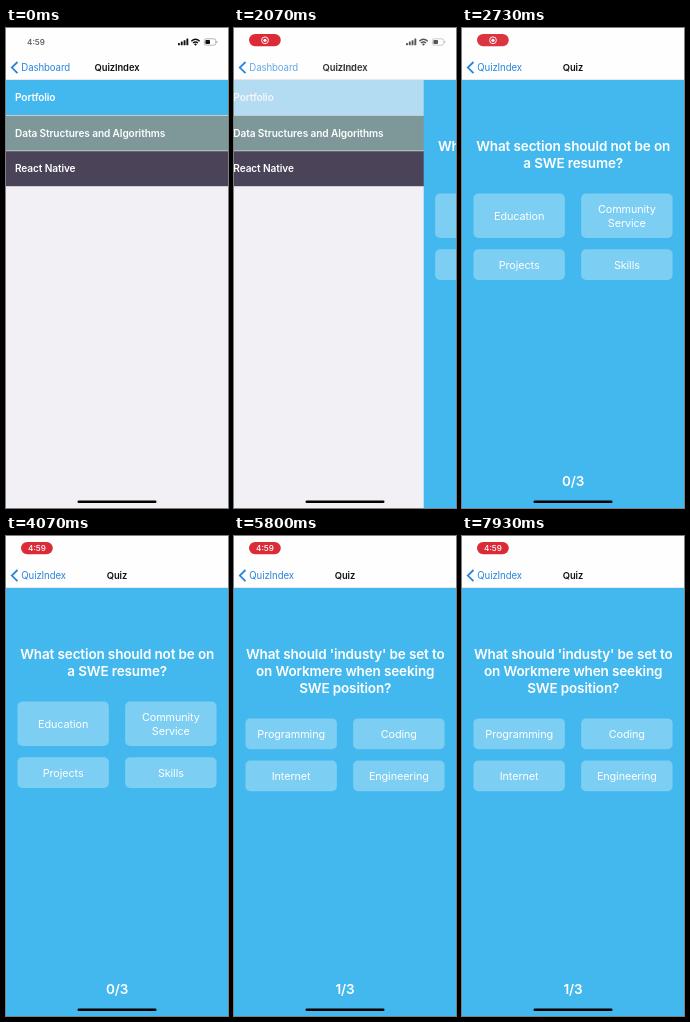
Write an HTML page that moves like this. It is 222 px wide and 480 px high and loops after 8 s.

```html
<!DOCTYPE html>
<html lang="en">
<head>
<meta charset="utf-8">
<title>Quiz app</title>
<style>
html, body { margin: 0; width: 100%; height: 100%; overflow: hidden; background: #f2f0f4; }
svg { display: block; width: 222px; height: 480px; }
text { font-family: Inter, "Liberation Sans", sans-serif; letter-spacing: -.01em; white-space: pre; }
.mid { text-anchor: middle; }
.row { font-size: 10.1px; font-weight: 600; fill: #fff; }
.title { font-size: 9.4px; font-weight: 600; fill: #111; }
.back { font-size: 9.65px; fill: #2685dc; }
.ask { font-size: 13.5px; font-weight: 600; fill: #fff; }
.answer { font-size: 10.85px; fill: #fff; }
.clock { font-size: 8.2px; font-weight: 500; letter-spacing: 0; }
</style>
</head>
<body>
<svg id="stage" viewBox="0 0 222 480"></svg>
<script>
const LOOP = 8000;
const BLUE = '#43b8ee';

const rect = (x, y, w, h, fill, rx = 0) =>
  `<rect x="${x}" y="${y}" width="${w}" height="${h}" rx="${rx}" fill="${fill}"/>`;
const text = (cls, x, y, s, extra = '') =>
  `<text class="${cls}" x="${x}" y="${y}" ${extra}>${s}</text>`;
const group = (id, body) => `<g id="${id}">${body}</g>`;

const row = (i, fill, label) => group('row' + i,
  rect(0, 52 + i * 35.6, 222, 35, fill) + text('row', 9, 73.2 + i * 35.6, label));

function button(id, x, y, h, lines) {
  const first = y + h / 2 + 4.1 - (lines.length - 1) * 6.8;
  return group(id, rect(x, y, 91.5, h, 'rgba(255,255,255,.3)', 5) +
    lines.map((s, i) => text('answer mid', x + 45.75, first + i * 13.6, s)).join(''));
}

function question(id, lines, tops, heights, answers, score) {
  const ask = lines.map((s, i) => text('ask mid', 111.2, 122.6 + i * 17, s)).join('');
  const buttons = answers.map((a, i) =>
    button(id + 'b' + i, i % 2 ? 119.1 : 11.4, tops[i >> 1], heights[i >> 1], a)).join('');
  return group(id, ask + buttons + text('ask mid', 111, 457.6, score));
}

const list = rect(0, 52, 222, 428, '#f2f0f4') +
  row(0, BLUE, 'Portfolio') +
  row(1, '#7e9798', 'Data Structures and Algorithms') +
  row(2, '#4b4459', 'React Native');

const quiz = rect(0, 52, 222, 428, BLUE) +
  question('q1', ['What section should not be on', 'a SWE resume?'], [165.5, 221.2], [44.4, 30.8],
    [['Education'], ['Community', 'Service'], ['Projects'], ['Skills']], '0/3') +
  question('q2', ["What should 'industy' be set to", 'on Workmere when seeking', 'SWE position?'],
    [182.4, 224.5], [30.8, 30.8],
    [['Programming'], ['Coding'], ['Internet'], ['Engineering']], '1/3');

const bars = [2.2, 3.6, 5, 6.6].map((h, i) => rect(172 + i * 2.8, 17.2 - h, 1.9, h, '#111', .5)).join('');
const wifi = `<g fill="none" stroke="#111" stroke-width="1.4">
  <path d="M185.3 13.2q4.2-3.8 8.4 0M187 15q2.5-2.2 5 0"/></g>
  <path d="M188 16.2q1.5-1.2 3 0l-1.5 1.5z" fill="#111"/>`;
const battery = `<rect x="198.3" y="10.8" width="11.4" height="6.4" rx="1.8" fill="none"
  stroke="#999" stroke-width=".7"/>` + rect(199.4, 11.9, 4.6, 4.2, '#111', .8) +
  rect(210.4, 13, .9, 2.2, '#999', .4);

const header = rect(0, 0, 222, 52, '#fefefe') + rect(0, 51.6, 222, .4, '#c8c8cc') +
  '<path d="M11.5 34L5.8 39.6L11.5 45.2" fill="none" stroke="#2685dc" stroke-width="1.8"/>' +
  text('back', 15.3, 43.2, 'Dashboard', 'id="oldBack"') +
  text('back', 15.3, 43.2, 'QuizIndex', 'id="newBack"') +
  text('title mid', 111, 43, 'QuizIndex', 'id="oldTitle"') +
  text('title mid', 111, 43, 'Quiz', 'id="newTitle"') +
  text('clock mid', 30, 17, '4:59', 'id="clock" fill="#555"') +
  group('pill', rect(15, 6, 31.8, 12.2, '#db2b37', 6.1) +
    group('dot', `<circle cx="31" cy="12.3" r="3.4" fill="none" stroke="#fff" stroke-width=".9"/>
      <circle cx="31" cy="12.3" r="1.6" fill="#fff"/>`) +
    text('clock mid', 31, 15.3, '4:59', 'id="pillClock" fill="#fff"')) +
  group('status', bars + wifi + battery);

const stage = document.getElementById('stage');
stage.innerHTML = group('list', list) + group('quiz', quiz) + header +
  rect(71.5, 472.4, 79, 2.6, '#000', 1.3);

const el = id => document.getElementById(id);
const fade = (id, v) => el(id).setAttribute('opacity', v);
const slide = (id, x) => el(id).setAttribute('transform', `translate(${x} 0)`);
const clamp = v => Math.min(1, Math.max(0, v));
const ramp = (t, a, b) => clamp((t - a) / (b - a));
const smooth = u => u * u * (3 - 2 * u);

// y of cubic-bezier(x1, y1, x2, y2) at x = u
function bezier(u, x1, y1, x2, y2) {
  const at = (s, a, b) => 3 * (1 - s) ** 2 * s * a + 3 * (1 - s) * s * s * b + s ** 3;
  let lo = 0, hi = 1;
  for (let i = 0; i < 24; i++) {
    const s = (lo + hi) / 2;
    if (at(s, x1, x2) < u) lo = s; else hi = s;
  }
  return at(hi, y1, y2);
}

// Touch feedback: dims at once, recovers after release
const touch = (t, down, up) => t < down ? 1 : .2 + .8 * smooth(ramp(t, up, up + 250));

function draw(t) {
  const push = t < 2050 ? 0 : bezier(ramp(t, 2050, 2550), .2833, .99, .31833, .99);
  slide('list', -66.6 * push);
  slide('quiz', 222 * (1 - push));
  fade('oldTitle', 1 - push);
  fade('newTitle', push);
  fade('oldBack', clamp(1 - 2 * push));
  fade('newBack', clamp(2 * push - .7));
  fade('status', clamp(1 - 2 * push));

  fade('row0', touch(t, 1930, 2000));
  const tap = touch(t, 5250, 5340);
  fade('q1b1', tap);
  fade('q2b1', tap);
  const second = t >= 5390;
  fade('q1', second ? 0 : 1);
  fade('q2', second ? 1 : 0);

  const shown = smooth(ramp(t, 0, 450));
  const swap = smooth(ramp(t, 3400, 3700));
  fade('clock', 1 - shown);
  fade('pill', shown * (.97 + .03 * Math.cos(t * Math.PI / 1000)));
  fade('dot', 1 - swap);
  fade('pillClock', swap);
}

function tick() {
  draw(performance.now() % LOOP);
  requestAnimationFrame(tick);
}
tick();
</script>
</body>
</html>
```
